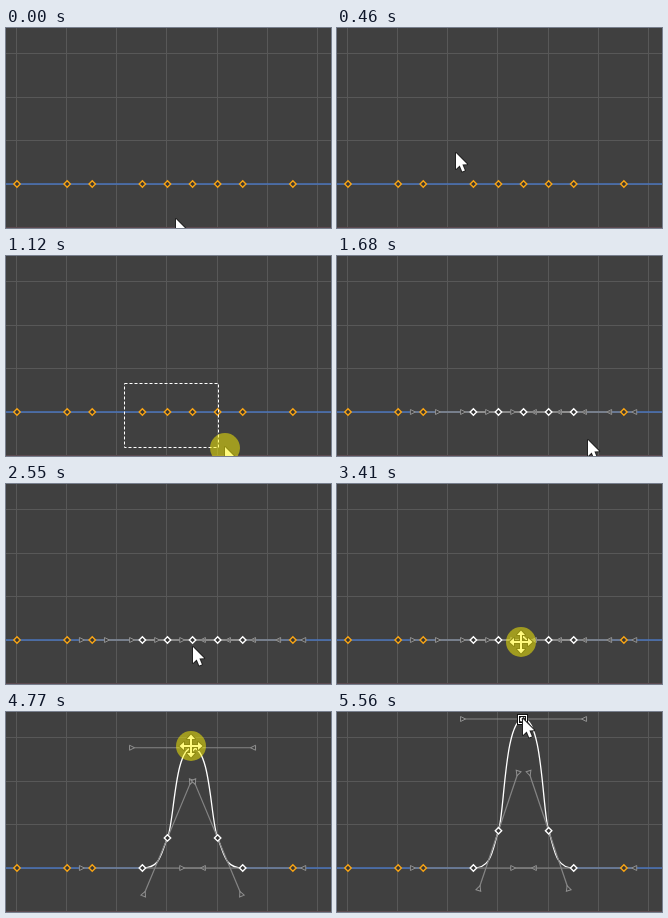
Animation, 325 px wide and 200 px high, one loop 7.39 s. Source, as an HTML page with a canvas:

```html
<!DOCTYPE html>
<html>
<head>
<meta charset="utf-8">
<title>Proportional editing in a curve editor</title>
<style>
html, body { margin: 0; width: 100%; height: 100%; overflow: hidden; background: #404040; }
canvas { display: block; }
</style>
</head>
<body>
<canvas id="stage" width="325" height="200"></canvas>
<script>
const ctx = document.getElementById('stage').getContext('2d');
const LOOP = 7390, BASE = 156, GAP = 25.08, HANDLE = 61, LIFT = 149;
const keyX = k => 11 + GAP * k;

// Fraction of n discrete steps taken; the first falls on a, the last on b.
function steps(t, a, b, n) {
  if (t < a) return 0;
  return Math.min(n, Math.floor((t - a) / (b - a) * (n - 1) + 0.15) + 1) / n;
}
const mix = (a, b, p) => a + (b - a) * p;
const mixPt = (a, b, p) => [mix(a[0], b[0], p), mix(a[1], b[1], p)];
const ease = p => p * p * (3 - 2 * p);

const START = [169, 190], CORNER = [118, 124], BEND = [212, 214], RELEASE = [250, 183],
  NEAR = [186, 162], GRAB = [183, 155.5], TOP = [185, 6];
const sweep = q => mixPt(mixPt(CORNER, BEND, q), mixPt(BEND, RELEASE, q), q);
const sweepTime = t => Math.max(0, (steps(t, 670, 1340, 10) * 10 - 1) / 9);
const dragTime = t => steps(t, 4410, 4850, 7);

function pointer(t) {
  if (t < 670) return mixPt(START, CORNER, ease(steps(t, 70, 460, 6)));
  if (t < 1830) return sweep(sweepTime(t));
  if (t < 2630) return mixPt(RELEASE, NEAR, ease(steps(t, 1830, 2550, 11)));
  if (t < 3130) return mixPt(NEAR, [183, 156.5], steps(t, 2630, 2980, 5));
  const p = dragTime(t);
  return [mix(GRAB[0], TOP[0], p ** 3), mix(GRAB[1], TOP[1], p ** 1.24)];
}

function stroke(color, width, ...pts) {
  ctx.strokeStyle = color;
  ctx.lineWidth = width;
  ctx.beginPath();
  pts.forEach(p => ctx.lineTo(p[0], p[1]));
  ctx.stroke();
}

function shape(pts, x, y) {
  ctx.beginPath();
  pts.forEach(p => ctx.lineTo(x + p[0], y + p[1]));
  ctx.closePath();
}

function grid() {
  ctx.fillStyle = '#404040';
  ctx.fillRect(0, 0, 325, 200);
  for (let i = 0; i < 7; i++) {
    const x = Math.floor(10.5 + 50.15 * i) + 0.5;
    stroke('#585858', 1, [x, 0], [x, 200]);
  }
  for (let i = 0; i < 5; i++) {
    const y = Math.floor(25.4 + 43.6 * i) + 0.5;
    stroke(i < 4 ? '#585858' : '#5c4a50', 1, [0, y], [325, y]);
  }
}

function diamond(x, y, color) {
  shape([[0, -3.2], [3.2, 0], [0, 3.2], [-3.2, 0]], x, y);
  ctx.fillStyle = '#363636';
  ctx.fill();
  ctx.strokeStyle = color;
  ctx.lineWidth = 1.4;
  ctx.stroke();
}

// Selected keys with the direction of their handles
function liftedKeys(d) {
  const rise = [0, 0.25, 1, 0.25, 0].map(f => f * d);
  const turn = [0, d, 0, -d, 0];
  return rise.map((r, i) => {
    const len = Math.hypot(2 * GAP, turn[i]);
    return { x: keyX(5 + i), y: BASE - r,
      hx: HANDLE * 2 * GAP / len, hy: -HANDLE * turn[i] / len };
  });
}

function curve(keys) {
  ctx.strokeStyle = '#fff';
  ctx.lineWidth = 1.3;
  ctx.beginPath();
  ctx.moveTo(keys[0].x, keys[0].y);
  for (let i = 1; i < keys.length; i++) {
    const a = keys[i - 1], b = keys[i];
    const f = Math.min(1, GAP / (a.hx + b.hx)); // overlapping handles shrink
    ctx.bezierCurveTo(a.x + a.hx * f, a.y + a.hy * f,
      b.x - b.hx * f, b.y - b.hy * f, b.x, b.y);
  }
  ctx.stroke();
}

function handles(k) {
  stroke('#858585', 1.2, [k.x - k.hx, k.y - k.hy], [k.x + k.hx, k.y + k.hy]);
  for (const s of [-1, 1]) {
    ctx.save();
    ctx.translate(k.x + s * k.hx, k.y + s * k.hy);
    ctx.rotate(Math.atan2(-s * k.hy, -s * k.hx));
    shape([[-2, -2.5], [3, 0], [-2, 2.5]], 0, 0);
    ctx.fillStyle = '#404040';
    ctx.fill();
    ctx.strokeStyle = '#909090';
    ctx.lineWidth = 1;
    ctx.stroke();
    ctx.restore();
  }
}

function outlined() {
  ctx.lineJoin = 'round';
  ctx.strokeStyle = '#222';
  ctx.lineWidth = 2;
  ctx.stroke();
  ctx.fillStyle = '#fff';
  ctx.fill();
  ctx.lineJoin = 'miter';
}

function arrow(x, y) {
  shape([[1, 1], [1, 17], [4.7, 13.6], [7.2, 19.6], [9.9, 18.4], [7.4, 12.6], [12.2, 12.2]], x, y);
  outlined();
}

function moveIcon(x, y) {
  const arm = [[1, -1], [1, -7], [4, -7], [0, -11.5], [-4, -7], [-1, -7]];
  const pts = [];
  for (let i = 0; i < 4; i++) {
    const c = Math.cos(-i * Math.PI / 2), s = Math.sin(-i * Math.PI / 2);
    arm.forEach(([u, v]) => pts.push([u * c - v * s, u * s + v * c]));
  }
  shape(pts, x, y);
  outlined();
}

function selectBox(t) {
  const q = sweepTime(t), [x, y] = sweep(q < 1 ? q * 0.9 : 1);
  ctx.strokeStyle = '#fff';
  ctx.lineWidth = 1;
  ctx.setLineDash([3, 2]);
  ctx.strokeRect(118.5, 127.5, Math.round(x + 1 - 118), Math.round(y + 3 - 127));
  ctx.setLineDash([]);
}

function draw(t) {
  const selected = t >= 1680, moving = t >= 3410 && t < 5480;
  const keys = liftedKeys(LIFT * dragTime(t) ** 1.39);
  grid();
  const blue = (a, b) => stroke('#4a74bc', 1.6, [a, BASE], [b, BASE]);
  if (selected) {
    blue(0, keys[0].x);
    blue(keys[4].x, 325);
    curve(keys);
    keys.forEach(handles);
  } else {
    blue(0, 325);
  }
  [0, 2, 3, 11].forEach(k => diamond(keyX(k), BASE, '#f8a414'));
  keys.forEach(k => diamond(k.x, k.y, selected ? '#fff' : '#f8a414'));
  if (t >= 670 && t < 1680) selectBox(t);

  const [x, y] = pointer(t).map(Math.round);
  if (t >= 5560) {
    ctx.lineWidth = 3;
    ctx.strokeStyle = '#111';
    ctx.strokeRect(181.5, 3.5, 8, 8);
    ctx.lineWidth = 1;
    ctx.strokeStyle = '#fff';
    ctx.strokeRect(181.5, 3.5, 8, 8);
  }
  if (moving) moveIcon(x + 1, y + 2);
  else arrow(x, y);
  if (moving || (t >= 670 && t < 1680)) {
    ctx.fillStyle = 'rgba(255,246,0,0.5)';
    ctx.beginPath();
    ctx.arc(x + 1, y + 2, 15, 0, 2 * Math.PI);
    ctx.fill();
  }
}

const begin = performance.now();
function frame() {
  draw((performance.now() - begin) % LOOP);
  requestAnimationFrame(frame);
}
frame();
</script>
</body>
</html>
```
